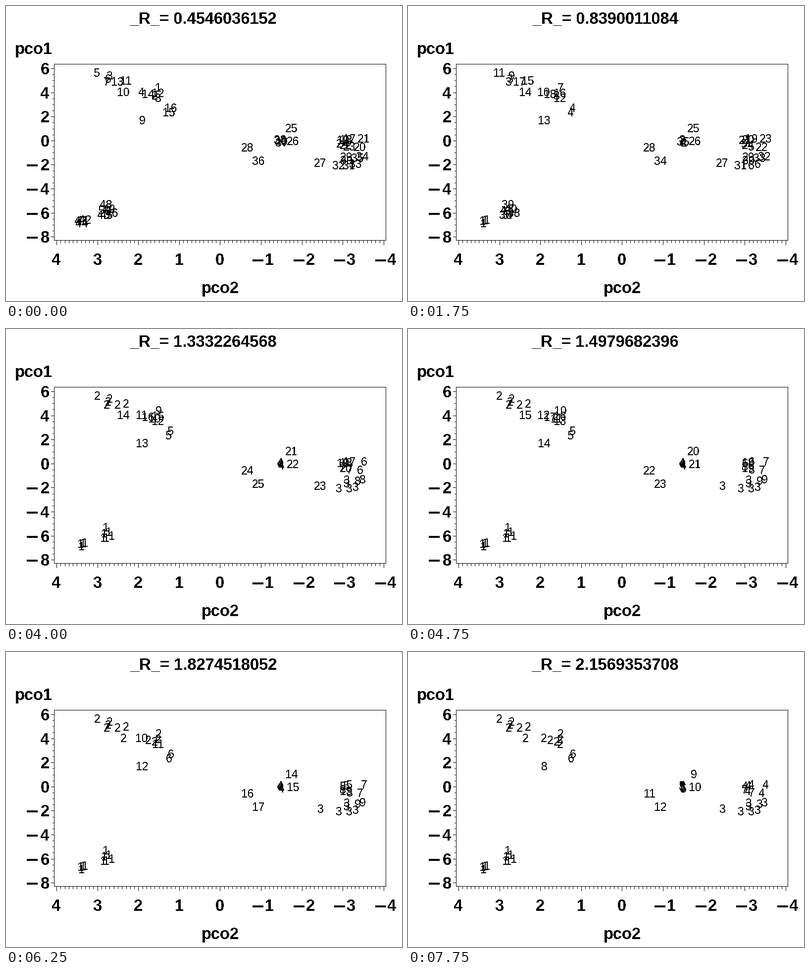
A matplotlib script for the animation above (8 s loop, 800 by 596 pixels).

```python
import math

import matplotlib.pyplot as plt
from matplotlib.animation import FuncAnimation
from matplotlib.patches import Rectangle

W, H = 800, 596
STEPS, INTERVAL = 32, 250
R_START, R_STEP = 0.4546036152, 0.0549139276
LEFT, TOP, RIGHT, BOTTOM = 97, 117, 767, 473
CROWD_RADIUS = 50

plt.rcParams["font.family"] = "Liberation Sans"

# Observations lie evenly along short strands: ids, first point, last point.
STRANDS = [
    ("5", (184, 135), (184, 135)),
    ("7 6 3", (203, 153), (209, 141)),
    ("13 11", (225, 153), (242, 151)),
    ("10 9", (237, 174), (275, 231)),
    ("4 14 2", (274, 174), (300, 181)),
    ("8 12 1", (307, 186), (308, 165)),
    ("15 16", (329, 215), (333, 206)),
    ("19 18 17", (681, 271), (694, 268)),
    ("24 22 23", (680, 278), (694, 284)),
    ("20 21", (715, 285), (723, 268)),
    ("25 26", (577, 247), (580, 273)),
    ("28 36", (488, 286), (510, 313)),
    ("27 32", (635, 317), (672, 322)),
    ("30 29", (688, 312), (688, 305)),
    ("31 33", (693, 322), (706, 319)),
    ("35 34", (710, 307), (720, 304)),
    ("38 39 40 37", (554, 270), (557, 276)),
    ("47 41 42", (151, 434), (160, 432)),
    ("44 43 50", (153, 439), (199, 413)),
    ("48 49 46", (202, 401), (214, 418)),
    ("45", (203, 422), (203, 422)),
]

# Step at which the listed observations, with all linked to them, become one.
LINKS = [
    (1, "41 47"), (2, "41 42"), (2, "37 38"), (3, "41 44"), (3, "15 16"),
    (4, "37 39"), (5, "6 7"), (6, "23 24"), (7, "31 33"), (8, "29 30"),
    (8, "34 35"), (9, "43 45"), (9, "3 6"), (10, "41 43"), (10, "5 6"),
    (10, "31 32"), (11, "41 46"), (11, "11 13"), (13, "41 49 50"),
    (14, "41 48"), (14, "37 40"), (14, "20 21"), (15, "6 11"), (16, "29 31"),
    (18, "27 29"), (19, "17 19"), (21, "17 18"), (21, "1 2 12 14"),
    (23, "6 10"), (24, "1 6"), (28, "1 4 8"), (28, "17 20 22"), (31, "29 34"),
]


def ids(text):
    return [int(n) for n in text.split()]


def place_points():
    points = {}
    for text, (x0, y0), (x1, y1) in STRANDS:
        strand = ids(text)
        for k, p in enumerate(strand):
            t = k / max(1, len(strand) - 1)
            points[p] = (x0 + t * (x1 - x0), y0 + t * (y1 - y0))
    # This one lies below the line between its strand's ends.
    points[43] = (points[45][0] - 6, points[45][1])
    return points


POINTS = place_points()


def crowd(group):
    """Most members of the group found around any one of them."""
    return max(sum(math.dist(POINTS[p], POINTS[q]) < CROWD_RADIUS
                   for q in group) for p in group)


def labels_at(step):
    """Merge linked points and number the clusters, densest first."""
    groups = [{p} for p in POINTS]
    for start, text in LINKS:
        if start <= step:
            linked = set(ids(text))
            merged = set().union(*(g for g in groups if g & linked))
            groups = [g for g in groups if not g & linked] + [merged]
    groups.sort(key=lambda g: (-crowd(g), min(g)))
    return {p: n for n, g in enumerate(groups, 1) for p in g}


fig = plt.figure(figsize=(W / 100, H / 100), dpi=100, facecolor="white")
ax = fig.add_axes([0, 0, 1, 1])
ax.set_xlim(0, W)
ax.set_ylim(H, 0)
ax.axis("off")


def write(x, y, text, px, weight="normal"):
    """Centred text with its baseline at y."""
    return ax.text(x, y, text, fontsize=px * 0.72, fontweight=weight,
                   ha="center", va="baseline", color="black",
                   antialiased=False)


def bold(x, y, text):
    return write(x, y, text, 32.6, "bold")


def bar(x, y, w, h):
    """Solid black block on whole pixels."""
    ax.add_patch(Rectangle((x, y), w, h, facecolor="black", lw=0,
                           antialiased=False, snap=False))


def x_pixel(v):
    return round(432.5 - 82.6 * v)


def y_pixel(v):
    return round(271.8 - 24.3 * v)


for y in (TOP, BOTTOM):
    bar(LEFT, y, RIGHT - LEFT + 1, 1)
for x in (LEFT, RIGHT):
    bar(x, TOP, 1, BOTTOM - TOP + 1)

for k in range(-40, 41):
    bar(x_pixel(k / 10), BOTTOM, 1, 10 if k % 10 == 0 else 6)
for k in range(-16, 13):
    size = 6 if k % 4 == 0 else 3
    bar(LEFT - size, y_pixel(k / 2), size, 1)

for v in range(-4, 5):
    x = x_pixel(v)
    bold(x + (17 if v < 0 else 0), 523, str(abs(v)))
    if v < 0:
        bar(x - 17, 512, 22, 4)
for v in range(-8, 7, 2):
    y = y_pixel(v)
    bold(79, y + 12, str(abs(v)))
    if v < 0:
        bar(42, y, 22, 4)

bold(56, 97, "pco1")
bold(433, 580, "pco2")
title = bold(399, 36, "")
marks = {p: write(x, y + 8, "", 23) for p, (x, y) in POINTS.items()}


def update(step):
    title.set_text(f"_R_= {R_START + R_STEP * step:.10f}")
    for p, label in labels_at(step).items():
        marks[p].set_text(str(label))
    return [title, *marks.values()]


anim = FuncAnimation(fig, update, frames=STEPS, interval=INTERVAL,
                     repeat=True, repeat_delay=0, blit=False)
plt.show()
```
